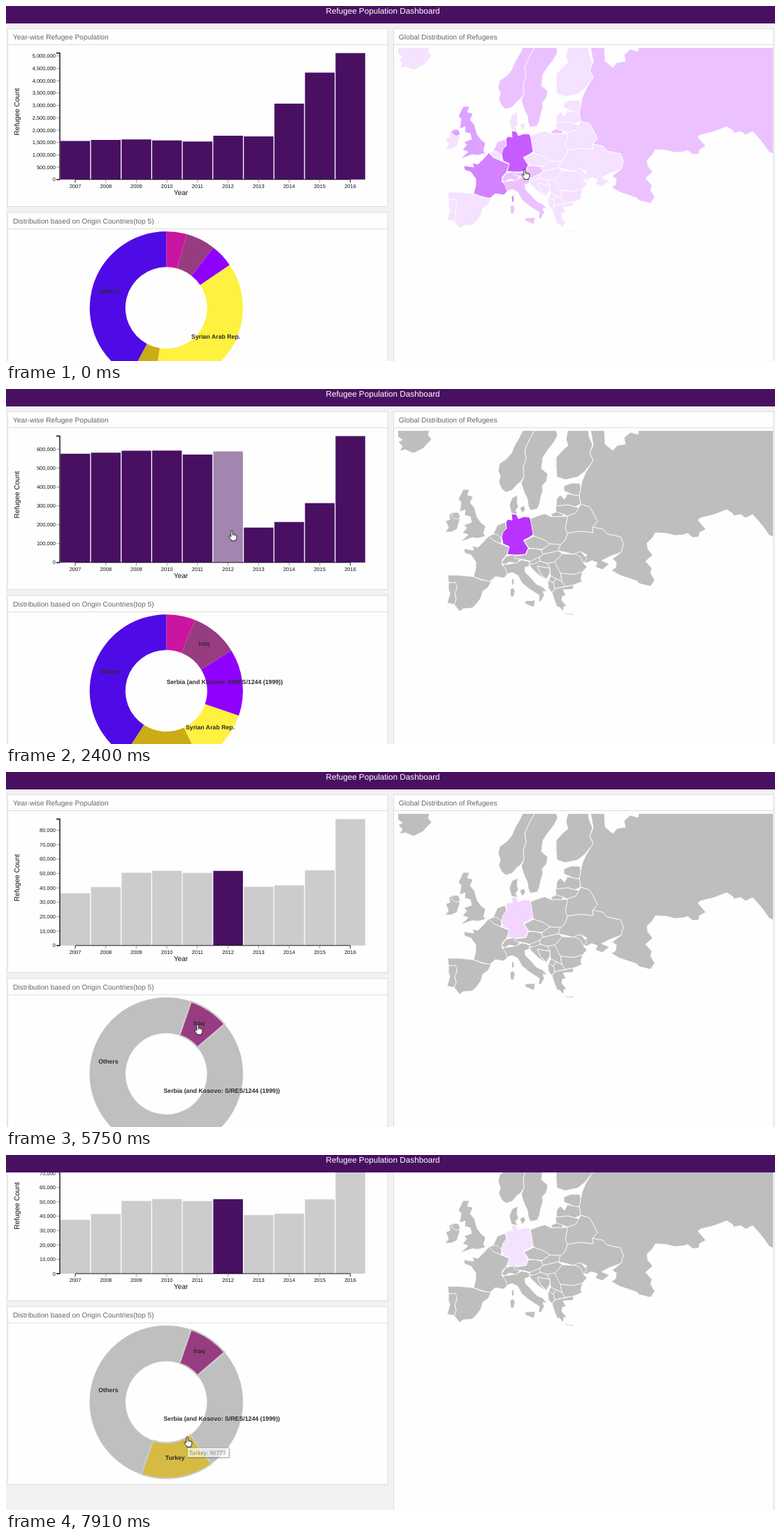
Recreate the animation shown at these times as an HTML page. Size 1100x509 px, loop 7.99 s.

```html
<!DOCTYPE html>
<html lang="en">
<head>
<meta charset="utf-8">
<title>Refugee Population Dashboard</title>
<style>
html, body { margin: 0; width: 100%; height: 100%; overflow: hidden; background: #f2f2f2; }
svg { display: block; width: 100%; height: 100%; font-family: "Liberation Sans", Arial, sans-serif; text-rendering: geometricPrecision; }
.card { fill: #fefefe; stroke: #dedede; stroke-width: 1; }
.rule { stroke: #dedede; }
.head { font-size: 10.2px; fill: #666; }
.axis { font-size: 7.5px; fill: #111; }
.name { font-size: 10.1px; fill: #111; }
.label { font-size: 8.75px; font-weight: bold; fill: #2c2c2c; text-anchor: middle; }
.tip text { font: 8.1px "Open Sans", "Noto Sans", sans-serif; fill: #575757; }
#map path { fill: #f4e2ff; stroke: #fff; stroke-width: .8; stroke-linejoin: round; }
#map .b { fill: #ebc2ff; }
#map .c { fill: #dda2ff; }
#map .d { fill: #d282ff; }
#map.muted path { fill: #bebebe; }
</style>
</head>
<body>
<svg viewBox="0 0 1100 509" preserveAspectRatio="none">
<defs>
  <clipPath id="mapBox"><rect x="561" y="60" width="536" height="480"/></clipPath>
  <clipPath id="barBox"><rect x="3" y="60" width="543" height="226"/></clipPath>
</defs>
<g id="page">
  <rect class="card" x="2.5" y="32.5" width="543.5" height="255"/>
  <path class="rule" d="M3 55.5H546"/>
  <text class="head" x="10" y="48.4">Year-wise Refugee Population</text>
  <rect class="card" x="2.5" y="296" width="543.5" height="255"/>
  <path class="rule" d="M3 319.5H546"/>
  <text class="head" x="10" y="311.7">Distribution based on Origin Countries(top 5)</text>
  <rect class="card" x="554.5" y="32.5" width="543.5" height="600"/>
  <path class="rule" d="M555 55.5H1098"/>
  <text class="head" x="561.8" y="48.4">Global Distribution of Refugees</text>

  <g id="map" clip-path="url(#mapBox)">
    <path class="b" d="M836 58L840 80 835 92 840 102 829 120 824 132 822 142 820 153 822 165 835 169 840 178 846 190 839 198 854 201 860 208 879 212 883 222 880 234 872 240 867 244 873 248 872 256 866 260 878 267 893 272 902 275 906 279 922 283 928 274 922 264 924 257 915 247 925 238 918 229 917 221 925 213 929 206 945 207 957 210 969 209 975 207 982 213 991 212 992 206 1001 201 990 188 993 185 1013 180 1031 173 1039 178 1041 182 1051 180 1058 185 1068 180 1077 190 1085 200 1091 209 1099 213V58H905L904 65 893 62 884 70 886 79 874 81 868 88 857 79 856 58Z"/>
    <path d="M560 58H606L604 66 609 72 602 79 597 85 583 92 571 87 563 89 567 82 561 76 567 73 560 68Z"/>
    <path class="b" d="M740 58L734 70 728 80 723 92 716 100 706 107 704 117 707 125 705 134 709 143 715 148 724 145 731 137 736 133 741 126 740 112 744 100 742 88 749 72 757 58Z"/>
    <path class="b" d="M757 58L749 72 742 88 744 100 740 112 741 126 737 135 742 150 746 158 747 167 750 174 760 172 763 165 765 155 768 145 767 139 773 132 775 122 766 114 768 98 776 86 784 76 789 66 787 58Z"/>
    <path d="M804 58L801 72 804 81 796 88 787 98 787 112 788 126 800 130 818 126 828 118 840 103 835 92 839 80 834 68 833 58Z"/>
    <path d="M798 139L808 135 821 135 822 142 820 153 812 152 805 149 798 146Z"/>
    <path d="M788 157L793 152 799 158 803 150 812 152 820 153 822 165 814 169 804 166 787 168Z"/>
    <path d="M786 168L804 166 814 169 820 170 815 178 803 182 796 179 787 177Z"/>
    <path class="b" d="M779 180L787 176 796 179 797 183 782 183Z"/>
    <path d="M803 182L815 178 820 169 822 165 835 169 840 178 846 190 839 198 840 206 822 204 800 207 800 198 802 190Z"/>
    <path d="M800 207L822 204 840 206 839 198 854 201 860 208 879 212 883 222 880 234 864 240 852 246 863 251 853 259 843 255 846 249 838 246 829 250 825 245 831 238 822 233 812 237 800 234 790 232 793 223 799 218 803 208Z"/>
    <path d="M750 186L763 181 771 179 780 183 797 183 803 182 802 190 800 198 803 208 799 218 793 223 778 222 769 216 755 211 752 204 752 196Z"/>
    <path d="M741 218L755 211 769 216 778 222 767 230 757 229 748 228Z"/>
    <path d="M766 231L778 222 793 223 790 232 777 235 768 237Z"/>
    <path d="M763 241L768 237 777 235 790 232 796 236 785 248 774 250 764 247Z"/>
    <path d="M785 248L796 236 812 237 820 235 826 244 827 251 831 255 825 262 812 266 793 264 788 256Z"/>
    <path d="M813 236L822 233 831 243 826 250 822 241Z"/>
    <path d="M793 264L812 266 825 262 822 272 824 276 812 281 800 283 795 276Z"/>
    <path d="M774 250L785 248 793 264 795 276 787 272 779 268 778 257Z"/>
    <path d="M749 247L763 241 764 247 757 251 749 251Z"/>
    <path d="M748 252L757 250 764 247 774 250 778 257 760 254 764 264 773 274 761 266 753 258Z"/>
    <path d="M760 254L778 257 778 264 773 273 764 264Z"/>
    <path d="M779 268L787 272 783 278 776 275Z"/>
    <path d="M775 274L783 278 785 286 781 292 776 286Z"/>
    <path d="M783 278L787 272 795 276 800 283 785 286Z"/>
    <path d="M781 292L786 286 803 283 812 281 811 287 797 288 801 296 796 297 795 303 802 311 798 312 797 319 792 313 788 312 785 304Z"/>
    <path d="M797 320L804 322 812 322 811 324 802 323Z"/>
    <path class="b" d="M711 252L720 251 730 249 738 245 749 248 748 254 742 256 743 263 750 270 759 280 768 284 774 291 768 290 770 296 765 305 762 304 763 296 749 287 738 278 732 267 724 263 715 266 713 258Z"/>
    <path class="b" d="M742 304L757 303 755 313 743 308Z"/>
    <path class="b" d="M721 287L726 285 728 290 726 298 722 298Z"/>
    <path class="b" d="M709 249L715 240 728 237 736 243 730 250 720 248 713 252Z"/>
    <path class="b" d="M726 240L744 237 747 229 757 229 766 231 768 237 763 241 750 247 738 244 728 243Z"/>
    <path class="d" d="M655 229L669 231 667 225 675 227 684 218 691 210 697 217 708 222 720 227 716 238 710 245 709 251 714 257 717 266 712 271 700 269 692 276 680 273 669 269 672 257 672 248 665 238 656 235Z"/>
    <path class="d" d="M723 274L726 271 727 279 724 282Z"/>
    <path d="M691 211L699 207 707 210 709 216 708 222 697 217Z"/>
    <path class="b" d="M697 208L703 195 714 191 716 199 711 206 709 214 703 209Z"/>
    <path d="M724 156L732 152 731 163 733 169 729 174 732 180 723 178 720 166Z"/>
    <path d="M735 170L741 167 743 173 738 178Z"/>
    <path d="M628 205L633 199 629 189 635 187 634 180 640 176 648 180 649 188 645 201 637 205Z"/>
    <path class="c" d="M640 177L647 177 650 184 644 187 637 182Z"/>
    <path class="c" d="M654 144L663 144 660 152 668 154 664 163 670 170 674 184 679 191 686 197 683 207 686 211 675 214 667 213 650 219 661 209 653 206 659 199 655 195 666 191 664 183 656 181 657 173 649 176 651 162 647 158Z"/>
    <path d="M632 267L648 267 668 269 681 274 694 276 690 284 682 290 679 300 674 307 667 314 654 315 649 319 641 309 644 300 642 294 645 284 642 278 633 277Z"/>
    <path d="M633 278L643 277 645 284 642 295 644 301 641 309 631 307 635 293 633 288Z"/>
    <path id="land" d="M723 179L730 180 733 186 741 183 749 184 751 190 754 209 748 213 740 217 747 228 743 237 732 238 717 237 720 226 711 222 709 212 711 205 716 200 715 191 718 187 724 188Z"/>
  </g>

  <g clip-path="url(#barBox)">
    <g id="bars"></g>
    <g id="yAxis" class="axis" text-anchor="end"></g>
    <path d="M72 67.5H77V248.8H72" fill="none" stroke="#000" stroke-width="1.3"/>
    <g id="xAxis" class="axis" text-anchor="middle"></g>
    <text class="name" x="240" y="271">Year</text>
    <text class="name" transform="translate(18.6 185.5)rotate(-90)">Refugee Count</text>
  </g>
  <g id="pie"></g>
  <g id="labels"></g>
</g>
<rect width="1100" height="25" fill="#491062"/>
<text x="539" y="10.6" font-size="11.7" fill="#fff" text-anchor="middle">Refugee Population Dashboard</text>
<g class="tip" id="tipA">
  <rect x="195.5" y="369.5" width="64" height="14" fill="#000" opacity=".3"/>
  <rect x="194" y="368" width="64" height="14" fill="#fff" stroke="#888" stroke-width=".7"/>
  <text x="197" y="378">Others: 263376</text>
</g>
<g class="tip" id="tipB">
  <rect x="261" y="421" width="59.5" height="14" fill="#000" opacity=".3"/>
  <rect x="259.5" y="419.5" width="59.5" height="14" fill="#fff" stroke="#888" stroke-width=".7"/>
  <text x="262" y="429.6">Turkey: 90773</text>
</g>
<g id="hand" stroke="#111" stroke-width=".9" stroke-linejoin="round">
  <path fill="#fff" d="M-1.2 1.2Q-1.2 0 0 0T1.2 1.2V5Q2.7 4.5 3.1 5.6Q4.5 5 5 6.2Q6.8 5.8 6.9 7.5V10Q6.9 11.6 5.7 13V14.6H-.8V13.4Q-2 12-4 8.9Q-4.4 7.6-3.3 7.4Q-2.4 7.4-1.2 9Z"/>
  <path fill="none" stroke-width=".6" d="M1.2 5V7.5M3.1 5.8V7.7M5 6.4V8"/>
</g>
</svg>
<script>
const LOOP = 7990, BASE = 248.8, FULL = 181.3, PURPLE = '#491062';
const CX = 229.3, CY = 432.8, R0 = 58.5, R1 = 109.6;
const $ = id => document.getElementById(id);
const mix = (a, b, p) => a + (b - a) * p;
const clamp = v => Math.max(0, Math.min(1, v));
const cubic = p => p < .5 ? 4 * p ** 3 : 1 - 4 * (1 - p) ** 3;
const within = (t, a, b) => t >= a && t < b;

function add(parent, tag, attrs, text) {
  const el = document.createElementNS('http://www.w3.org/2000/svg', tag);
  for (const k in attrs) el.setAttribute(k, attrs[k]);
  if (text) el.textContent = text;
  return parent.appendChild(el);
}

// bar heights in pixels, axis maximum and tick step
const charts = [
  { at: 0, max: 5.12e6, step: 5e5, h: [55.3, 56.8, 57.5, 56.1, 54.5, 62.8, 61.8, 108.8, 153.3, FULL] },
  { at: 565, max: 669700, step: 1e5, h: [156, 157.5, 160.3, 160.5, 154.8, 159.3, 50.1, 58.1, 85.2, FULL] },
  { at: 5135, max: 86000, step: 1e4, h: [73, 82, 103, 106, 103, 105.8, 85, 87, 108.4, FULL] },
  { at: 7727, max: 142000, step: 2e4, h: [142, 142, 124, 120, 120, 122, 68, 70, 77, 138] }
];
// slice ends in degrees, clockwise from the top
const pies = [
  { at: 0, ends: [15.3, 38, 55.8, 189.2, 208], names: ['', '', '', 'Syrian Arab Rep.', '', 'Others'] },
  { at: 565, ends: [21.8, 58.1, 108.9, 154.5, 213], names: ['', 'Iraq', 'Serbia (and Kosovo: S/RES/1244 (1999))', 'Syrian Arab Rep.', 'Turkey', 'Others'] },
  { at: 2720, ends: [18.9, 49.4, 74.6, 144, 199], names: ['', 'Iraq', '', 'Serbia (and Kosovo: S/RES/1244 (1999))', 'Turkey', 'Others'] }
];
const hues = ['#cb14a0', '#983c82', '#8f00ff', '#fff13f', '#cbab16', '#4f0be6'];
// time, x and y of the fingertip
const track = [
  [0, 742, 234], [40, 742, 234], [380, 740.5, 222], [1380, 740.5, 222], [1650, 560, 146], [1950, 362, 212],
  [2140, 362, 212], [2390, 323, 203], [3590, 323, 203], [4250, 195, 353], [4760, 195, 353],
  [5120, 274, 362], [6110, 274, 362], [6310, 286, 386], [7090, 286, 386], [7440, 259, 404], [LOOP, 259, 404]
];
const barHover = [[6, 1820, 2180], [5, 2250, 3660]];
const pieHover = [[5, 4100, 4870], [2, 6180, 6830], [3, 6830, 7280], [4, 7280, LOOP]];
const hovered = (list, i, t) => list.some(([k, a, b]) => k === i && within(t, a, b));

const barX = i => 77.9 + 43.72 * i;
const bars = charts[0].h.map((_, i) => add($('bars'), 'rect', { x: barX(i), width: 42.4 }));
add($('xAxis'), 'path', { d: 'M99 248.8H492.5', stroke: '#000', 'stroke-width': .9 });
bars.forEach((_, i) => {
  const x = 99 + 43.72 * i;
  add($('xAxis'), 'path', { d: `M${x} 249v4.5`, stroke: i % 9 ? '#888' : '#000', 'stroke-width': .8 });
  add($('xAxis'), 'text', { x, y: 261 }, 2007 + i);
});
const slices = [];
for (const i of [0, 3, 5, 2, 1, 4]) slices[i] = add($('pie'), 'path', {});
const labels = hues.map(() => add($('labels'), 'text', { class: 'label' }));

function phase(list, t) {
  const n = list.filter(s => s.at <= t).length - 1;
  return { from: list[Math.max(0, n - 1)], to: list[n], p: n ? cubic(clamp((t - list[n].at) / 750)) : 1 };
}

function point(r, deg) {
  const a = deg * Math.PI / 180;
  return [CX + r * Math.sin(a), CY - r * Math.cos(a)];
}

function ring(a, b) {
  const big = b - a > 180 ? 1 : 0;
  return `M${point(R1, a)}A${R1} ${R1} 0 ${big} 1 ${point(R1, b)}L${point(R0, b)}A${R0} ${R0} 0 ${big} 0 ${point(R0, a)}Z`;
}

function ticks({ max, step }) {
  return Array.from({ length: Math.floor(max / step) + 1 }, (_, i) => i * step);
}

function drawChart(t) {
  const { from, to, p } = phase(charts, t);
  bars.forEach((bar, i) => {
    const h = mix(from.h[i], to.h[i], p);
    bar.setAttribute('y', BASE - h);
    bar.setAttribute('height', h);
    bar.setAttribute('fill', t >= 2740 && i !== 5 ? '#ccc' : PURPLE);
    bar.setAttribute('fill-opacity', hovered(barHover, i, t) ? .5 : 1);
  });
  const before = ticks(from), after = ticks(to);
  $('yAxis').innerHTML = [...new Set([...before, ...after])].map(v => {
    const y = BASE - FULL * mix(v / from.max, v / to.max, p);
    const o = !after.includes(v) ? 1 - p : before.includes(v) ? 1 : p;
    return y < 50 ? '' : `<g opacity="${o}"><path d="M72 ${y}h5" stroke="#888" stroke-width=".8"/>` +
      `<text x="71" y="${y + 2.6}">${v.toLocaleString('en-US')}</text></g>`;
  }).join('');
}

function drawPie(t) {
  const { from, to, p } = phase(pies, t);
  const ends = [0, ...to.ends.map((e, i) => mix(from.ends[i], e, p)), 360];
  const muted = t >= 5220;
  slices.forEach((slice, i) => {
    const picked = muted && (i === 1 || i === 4 && t >= 7750);
    const over = hovered(pieHover, i, t);
    const grey = muted && !picked;
    const fill = !grey ? hues[i] : over ? '#999' : '#bfbfbf';
    slice.setAttribute('d', ring(ends[i], ends[i + 1]));
    slice.setAttribute('fill', fill);
    slice.setAttribute('fill-opacity', over && !grey ? .8 : 1);
    // a hairline in the fill colour closes the seams between grey slices
    slice.setAttribute('stroke', picked ? '#ccc' : grey ? fill : 'none');
    slice.setAttribute('stroke-width', picked ? 2.2 : .4);
    const [x, y] = point((R0 + R1) / 2, (ends[i] + ends[i + 1]) / 2);
    labels[i].setAttribute('x', x);
    labels[i].setAttribute('y', y - .5);
    labels[i].textContent = to.names[i];
  });
}

function drawMap(t) {
  $('map').classList.toggle('muted', t >= 580);
  const tone = (a, b, p) => `rgb(${a.map((v, i) => Math.round(mix(v, b[i], p)))})`;
  const deep = [184, 51, 255], soft = [236, 196, 255], pale = [245, 226, 255];
  $('land').style.fill = t < 1440 ? '#c65cff'
    : t < 5135 ? tone(deep, soft, cubic(clamp((t - 2720) / 750)))
    : tone(soft, pale, clamp((t - 5135) / 1000));
}

function drawHand(t) {
  const i = track.findIndex(k => k[0] > t);
  const [t0, x0, y0] = track[i - 1], [t1, x1, y1] = track[i];
  const p = (t - t0) / (t1 - t0);
  $('hand').setAttribute('transform', `translate(${mix(x0, x1, p)} ${mix(y0, y1, p)})`);
  $('tipA').setAttribute('opacity', within(t, 4395, 4790) ? 1 : 0);
  $('tipB').setAttribute('opacity', .65 * clamp((t - 7800) / 100));
}

function draw(t) {
  drawChart(t);
  drawPie(t);
  drawMap(t);
  drawHand(t);
  const scroll = 78.7 * (1 - (1 - clamp((t - 6500) / 380)) ** 4);
  $('page').setAttribute('transform', `translate(0 ${-scroll})`);
}

const start = performance.now();
function frame() {
  draw((performance.now() - start) % LOOP);
  requestAnimationFrame(frame);
}
frame();
</script>
</body>
</html>
```
